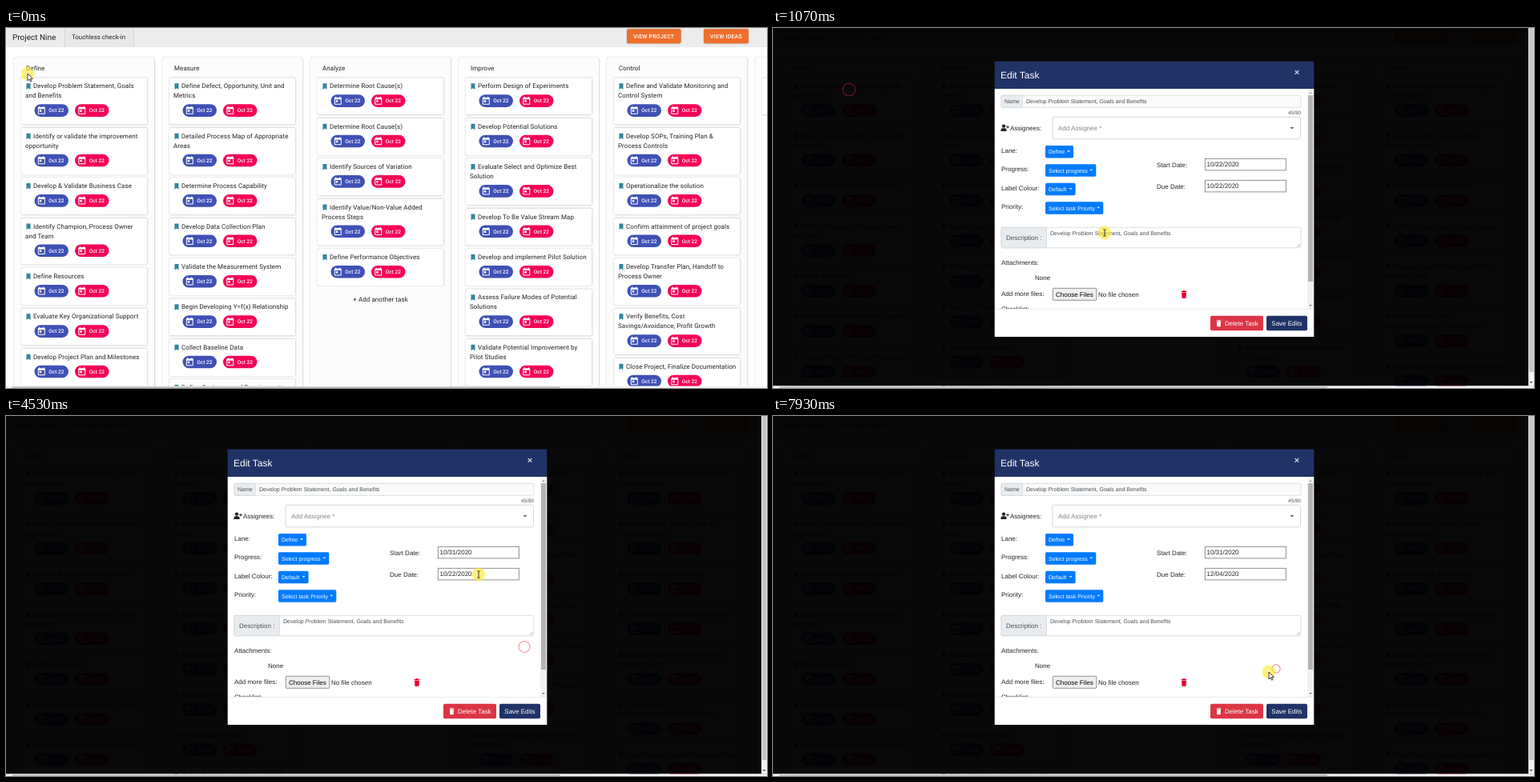
Recreate the animation shown at these times as an HTML page. Size 950 px wide and 450 px high, loop 8 s.

```html
<!DOCTYPE html>
<html lang="en">
<head>
<meta charset="utf-8">
<title>Edit task dates</title>
<style>
html, body { margin: 0; width: 100%; height: 100%; overflow: hidden; background: #fff; }
svg { display: block; width: 950px; height: 450px; text-rendering: geometricPrecision; }
text { white-space: pre; }
.board { font-family: Roboto, sans-serif; }
.modal { font-family: "Liberation Sans", Arial, sans-serif; }
.raised { filter: drop-shadow(0 .5px .5px rgba(0, 0, 0, .3)) drop-shadow(0 .5px 1px rgba(0, 0, 0, .18)); }
</style>
</head>
<body>
<svg id="stage" viewBox="0 0 950 450"></svg>
<script>
const LOOP = 8000;
const NAVY = '#203367';

const rect = (x, y, w, h, fill, attrs = '') =>
  `<rect x="${x}" y="${y}" width="${w}" height="${h}" fill="${fill}" ${attrs}/>`;
const path = (d, fill, attrs = '') => `<path d="${d}" fill="${fill}" ${attrs}/>`;
// cy is the middle of the capitals
const text = (x, cy, str, size = 8, fill = '#212529', attrs = '') =>
  `<text x="${x}" y="${cy + size * .36}" font-size="${size}" fill="${fill}" ${attrs}>${str.replace(/&/g, '&amp;')}</text>`;
const caret = (x, y, w, fill) => path(`M${x - w} ${y - w / 2}h${2 * w}l${-w} ${w}z`, fill);

// ---------- board ----------
const columns = [
  ['Define', 'Develop Problem Statement, Goals|and Benefits', 'Identify or validate the improvement|opportunity',
    'Develop & Validate Business Case', 'Identify Champion, Process Owner|and Team', 'Define Resources',
    'Evaluate Key Organizational Support', 'Develop Project Plan and Milestones'],
  ['Measure', 'Define Defect, Opportunity, Unit and|Metrics', 'Detailed Process Map of Appropriate|Areas',
    'Determine Process Capability', 'Develop Data Collection Plan', 'Validate the Measurement System',
    'Begin Developing Y=f(x) Relationship', 'Collect Baseline Data', 'Define Customer and Requirements'],
  ['Analyze', 'Determine Root Cause(s)', 'Determine Root Cause(s)', 'Identify Sources of Variation',
    'Identify Value/Non-Value Added|Process Steps', 'Define Performance Objectives'],
  ['Improve', 'Perform Design of Experiments', 'Develop Potential Solutions', 'Evaluate Select and Optimize Best|Solution',
    'Develop To Be Value Stream Map', 'Develop and implement Pilot Solution',
    'Assess Failure Modes of Potential|Solutions', 'Validate Potential Improvement by|Pilot Studies'],
  ['Control', 'Define and Validate Monitoring and|Control System', 'Develop SOPs, Training Plan &|Process Controls',
    'Operationalize the solution', 'Confirm attainment of project goals', 'Develop Transfer Plan, Handoff to|Process Owner',
    'Verify Benefits, Cost|Savings/Avoidance, Profit Growth', 'Close Project, Finalize Documentation'],
  ['', '']
];
const dayIcon = 'M19 3h-1V1h-2v2H8V1H6v2H5c-1.1 0-2 .9-2 2v14c0 1.1.9 2 2 2h14c1.1 0 2-.9 2-2V5c0-1.1-.9-2-2-2zm0 16H5V8h14v11zM7 10h5v5H7z';

const chip = (x, cy, fill) => rect(x, cy - 7.8, 42.5, 15.6, fill, 'rx="7.8"') +
  path(dayIcon, '#fff', `transform="translate(${x + 2.8} ${cy - 5.8}) scale(.5)"`) +
  text(x + 17.8, cy, 'Oct 22', 6.5, '#fff', 'font-weight="500"');

function card(x, y, title) {
  const lines = title.split('|');
  const height = 34.2 + 12 * lines.length;
  const chipY = y + 16.8 + 12 * lines.length;
  return rect(x + 9, y, 157.5, height, '#fff', 'rx="2" class="raised"') +
    path(`M${x + 15.5} ${y + 7}h5v7.5l-2.5-1.6l-2.5 1.6z`, '#31849b') +
    lines.map((line, i) => text(x + (i ? 14 : 24), y + 10.3 + 12 * i, line, 8, '#222', 'letter-spacing=".075"')).join('') +
    chip(x + 25.5, chipY, '#3f51b5') + chip(x + 76, chipY, '#f50057');
}

function column([title, ...tasks], index) {
  const x = 10 + 185 * index;
  let y = 62.3;
  let out = rect(x, 37, 175.5, 425, '#fcfcfc', 'rx="3" class="raised"') + text(x + 15, 50.5, title, 8, '#222', 'letter-spacing=".075"');
  for (const task of tasks) {
    out += card(x, y, task);
    y += task.includes('|') ? 62.4 : 50.4;
  }
  return out;
}

const orangeButton = (x, w, label) => rect(x, 1.2, w, 18, '#ee6f2d', 'rx="2" class="raised"') +
  text(x + w / 2, 10.1, label, 7, '#fff', 'font-weight="500" letter-spacing=".2" text-anchor="middle"');

const board = `<g class="board">` + rect(0, 0, 950, 450, '#fff') + rect(0, 0, 950, 24, '#ececec') +
  rect(73, 0, 86.5, 24, '#e8e8e8') + rect(73, 0, .7, 24, '#ccc') + rect(159, 0, .7, 24, '#ccc') +
  text(8, 11, 'Project Nine', 10, '#222') + text(82, 10.7, 'Touchless check-in', 7.9, '#222') +
  orangeButton(775, 67.5, 'VIEW PROJECT') + orangeButton(871, 56, 'VIEW IDEAS') +
  columns.map(column).join('') +
  text(467.5, 338.7, '+ Add another task', 8, '#222', 'text-anchor="middle" letter-spacing=".075"') +
  `<path id="hover" d="M20 121h156" stroke="#777" stroke-width="1" opacity="0"/></g>`;

const pageScrollbar = rect(0, 447.5, 950, 2.5, '#f4f4f4') + rect(8, 448.3, 684, 1.7, '#c1c1c1');
const sideScrollbar = rect(943, 0, 7, 447.5, '#f1f1f1') + rect(944, 0, 5.5, 430, '#c6c6c6') + caret(946.5, 443, 2, '#444');

// ---------- dialog ----------
const blueButton = (y, w, label) => rect(340, y, w, 15.5, '#007bff', 'rx="1.7"') +
  text(344, y + 7.8, label, 7, '#fff') + caret(340 + w - 6, y + 7.3, 1.9, '#fff');
const field = (x, y, w, h, fill = '#fff', stroke = '#ced4da', rx = 1.7) =>
  rect(x, y, w, h, fill, `stroke="${stroke}" stroke-width=".7" rx="${rx}"`);
const trash = (x, y, s, fill) => path('M-3-3.6h2l.5-.9h1l.5.9h2v1h-6zM-2.6-2h5.2l-.3 6.5h-4.6z', fill, `transform="translate(${x} ${y}) scale(${s})"`);
const taskName = 'Develop Problem Statement, Goals and Benefits';

const body = field(285, 84.3, 374, 15, '#fafafa') + field(285, 84.3, 26.5, 15, '#e9ecef') +
  text(289, 91.8, 'Name', 7, '#495057') + text(316, 91.8, taskName, 7, '#495057') +
  text(659, 106, '45/80', 6.4, '#555', 'text-anchor="end"') +
  `<circle cx="288" cy="122.6" r="2.2" fill="#212529"/>` + path('M284.4 129v-1.5q0-2.3 2.4-2.3h2.4q2.4 0 2.4 2.3v1.5zM291.2 123.3h1.3v-1.3h1v1.3h1.3v1h-1.3v1.3h-1v-1.3h-1.3z', '#212529') +
  text(296, 125, 'Assignees:') + field(349, 111.3, 309.5, 27.5, '#fff', '#c8c8c8', 2) +
  text(356, 125, 'Add Assignee *', 8, '#858585') + caret(648, 125.3, 2.6, '#666') +
  text(285, 153, 'Lane:') + text(285, 176.3, 'Progress:') + text(285, 200, 'Label Colour:') + text(285, 223.3, 'Priority:') +
  blueButton(147, 35, 'Define') + blueButton(170.3, 63.3, 'Select progress') +
  blueButton(193.8, 37.6, 'Default') + blueButton(217.3, 72.3, 'Select task Priority') +
  text(479, 170.7, 'Start Date:') + text(479, 197.7, 'Due Date:') +
  `<rect id="startBox" x="539.3" y="163.3" width="101" height="14.6" fill="#fff"/>
   <rect id="dueBox" x="539.3" y="190.3" width="101" height="14.6" fill="#fff"/>
   <text id="startDate" x="541.5" y="173.2" font-size="8" fill="#212529"></text>
   <text id="dueDate" x="541.5" y="200.2" font-size="8" fill="#212529"></text>
   <rect id="inputCaret" x="561.7" width=".7" height="9" fill="#000"/>` +
  field(285, 249.3, 374, 25.5) + field(285, 249.3, 56.5, 25.5, '#e9ecef') +
  text(291, 262, 'Description :', 8, '#495057') + text(346, 256.8, taskName, 7, '#495057') +
  path('M654 273.6l3.8-3.8M656 273.6l1.8-1.8', 'none', 'stroke="#888" stroke-width=".6"') +
  text(285, 293.3, 'Attachments:') + text(327, 312.3, 'None') + text(285, 332, 'Add more files:') +
  field(349.3, 325.3, 54.5, 15, '#efefef', '#666', 1) + text(353, 332.8, 'Choose Files', 8, '#000') +
  text(406, 332.8, 'No file chosen') + trash(513, 332.8, 1.1, '#e4002b') + text(285, 351, 'Checklist:');

const modal = `<g id="modal" class="modal">` + rect(276.7, 76, 398.6, 310, '#fff') +
  rect(276.7, 41.7, 398.6, 34.3, NAVY) + text(284, 58.5, 'Edit Task', 12, '#fff') +
  text(654, 55.5, '×', 11, '#d5dae6', 'text-anchor="middle" font-weight="bold"') +
  `<clipPath id="bodyClip"><rect x="277" y="76" width="398" height="275"/></clipPath><g clip-path="url(#bodyClip)">${body}</g>` +
  rect(667, 76, 8, 275, '#f1f1f1') + rect(668, 84, 6, 233, '#b4b4b4') +
  caret(671, 347, 1.7, '#444') + path('M669.3 82h3.4l-1.7-1.8z', '#888') +
  rect(276.7, 351, 398.6, .6, '#dee2e6') +
  rect(546, 359.7, 66, 18.5, '#dc3545', 'rx="2"') + trash(556.5, 369, .95, '#fff') + text(564, 369, 'Delete Task', 8, '#fff') +
  rect(616, 359.7, 51, 18.5, NAVY, 'rx="2"') + text(622.3, 369, 'Save Edits', 8, '#fff') + `</g>`;

// ---------- date picker ----------
// Five weeks from firstDay; numbering restarts once after lastDay.
function calendar(id, y, title, firstDay, lastDay, selected, accent) {
  const middle = 'text-anchor="middle"';
  const cellX = i => 550.7 + 16.23 * i;
  let out = rect(539.7, y, 119.5, 118.3, '#fff', 'stroke="#aeaeae" stroke-width=".6" rx="1.8"') +
    rect(540, y + .3, 119, 29.5, '#f0f0f0', 'rx="1.6"') + rect(540, y + 29.5, 119, .5, '#aeaeae') +
    path(`M584.5 ${y + .4}l4-4l4 4z`, '#f0f0f0', 'stroke="#bbb" stroke-width=".4"') +
    path(`M551.5 ${y + 6}v5.6l-3.4-2.8zM647.5 ${y + 6}v5.6l3.4-2.8z`, '#c4c4c4') +
    text(599.5, y + 9.2, title, 7.55, '#000', middle + ' font-weight="bold"');
  ['Su', 'Mo', 'Tu', 'We', 'Th', 'Fr', 'Sa'].forEach((d, i) => out += text(cellX(i), y + 23, d, 6.4, '#000', middle));
  for (let i = 0; i < 35; i++) {
    const count = firstDay + i;
    const day = count > lastDay ? count - lastDay : count;
    const x = cellX(i % 7), cy = y + 42.4 + 16.2 * Math.floor(i / 7);
    const chosen = i === selected;
    if (chosen) out += rect(x - 6.8, cy - 6.8, 13.6, 13.6, accent, 'rx="2.4"');
    out += text(x, cy, String(day), 6.4, chosen ? '#fff' : '#000', middle);
  }
  return `<g id="${id}" class="modal">${out}</g>`;
}

// ---------- pointer ----------
const ink = 'stroke="#111" stroke-width=".8" stroke-linejoin="round"';
const pointer = `<circle id="ring" fill="none" stroke="#e8203c" stroke-width="1.1"/>
  <g id="pointer"><circle r="8.4" fill="#ffe92e" opacity=".62"/>
  ${path('M0 0v9l2.1-2l1.4 3.2l1.4-.6l-1.4-3.1h2.8z', '#fff', `id="arrow" ${ink}`)}
  ${path('M-.7.6q.9-1 1.7 0v4.2l4 .8q1.2.4 1 1.8l-.6 4.6h-4.9l-3-4.2q.3-1.4 1.8-.2z', '#fff', `id="hand" ${ink}`)}
  ${path('M-1.8-4.2q1.8 0 1.8.9q0-.9 1.8-.9M0-3.3v6.8M-1.8 4.4q1.8 0 1.8-.9q0 .9 1.8.9', 'none', 'id="beam" stroke="#222" stroke-width=".9"')}</g>`;

document.getElementById('stage').innerHTML = board +
  rect(0, 0, 950, 447.5, '#000', 'id="backdrop"') + pageScrollbar + `<g id="side">${sideScrollbar}</g>` + modal +
  calendar('startOctober', 184, 'October 2020', 27, 30, 25, '#216ba5') +
  calendar('dueOctober', 211, 'October 2020', 27, 30, 25, '#216ba5') +
  calendar('dueNovember', 211, 'November 2020', 1, 30, 21, '#2a87d0') + pointer;

// ---------- timeline ----------
const DIM = 578, OPEN = 587, START_FOCUS = 2700, START_PICK = 4130, DUE_FOCUS = 4950, NEXT_MONTH = 6250, DUE_PICK = 7680;
const moves = [
  [0, 27, 57], [70, 27, 57], [480, 95, 77], [760, 95, 77], [1070, 414, 256], [1550, 375, 348], [1800, 362, 350],
  [2480, 590, 170], [2740, 590, 170], [3000, 636, 278], [3450, 647, 288], [4230, 647, 288], [4520, 590, 198],
  [5240, 590, 198], [5530, 646, 325], [5670, 646, 325], [6060, 651, 219], [6680, 651, 219], [7250, 628, 316],
  [7740, 628, 316], [7920, 619, 320], [8000, 619, 320]
];
const shapes = [[0, 'arrow'], [300, 'hand'], [780, 'arrow'], [1030, 'beam'], [1150, 'arrow'], [2330, 'beam'],
  [2800, 'hand'], [4160, 'arrow'], [4470, 'beam'], [5330, 'hand'], [7700, 'arrow']];
const clicks = [[560, 95, 77], [START_FOCUS - 40, 590, 170], [START_PICK, 647, 288.5], [DUE_FOCUS - 40, 590, 198],
  [NEXT_MONTH, 651, 219], [DUE_PICK, 628, 316]];

const clamp = v => Math.max(0, Math.min(1, v));
const smooth = v => v * v * (3 - 2 * v);
const latest = (list, t) => list.filter(item => item[0] <= t).pop();
const $ = id => document.getElementById(id);
const set = (id, attrs) => { for (const k in attrs) $(id).setAttribute(k, attrs[k]); };
const show = (id, on) => { $(id).style.display = on ? '' : 'none'; };

function position(t) {
  const next = Math.max(1, moves.findIndex(m => m[0] > t));
  const [t0, x0, y0] = moves[next - 1], [t1, x1, y1] = moves[next];
  const k = smooth(clamp((t - t0) / (t1 - t0)));
  return [x0 + (x1 - x0) * k, y0 + (y1 - y0) * k];
}

function render(t) {
  const fade = clamp((t - OPEN) / 150);
  const slide = -25 * (1 - clamp((t - OPEN) / 280)) ** 2;
  set('backdrop', { opacity: .965 * clamp((t - DIM) / 150) });
  set('side', { opacity: fade });
  set('modal', { opacity: fade, transform: `translate(0 ${slide})` });
  set('hover', { opacity: t > 400 ? .8 : 0 });

  const startOpen = t >= START_FOCUS && t < START_PICK;
  const dueOpen = t >= DUE_FOCUS && t < DUE_PICK;
  show('startOctober', startOpen);
  show('dueOctober', dueOpen && t < NEXT_MONTH);
  show('dueNovember', dueOpen && t >= NEXT_MONTH);
  $('startDate').textContent = t < START_PICK ? '10/22/2020' : '10/31/2020';
  $('dueDate').textContent = t < DUE_PICK ? '10/22/2020' : '12/04/2020';

  const dueFocused = dueOpen && t < NEXT_MONTH;
  const border = on => ({ stroke: on ? '#101010' : '#767676', 'stroke-width': on ? 1.5 : .8 });
  set('startBox', border(startOpen));
  set('dueBox', border(dueFocused));
  set('inputCaret', { y: startOpen ? 165.8 : 192.8 });
  show('inputCaret', startOpen && (t - START_FOCUS) % 1000 < 500 || dueFocused && (t - DUE_FOCUS) % 1000 < 500);

  const [x, y] = position(t);
  set('pointer', { transform: `translate(${x} ${y})` });
  const shape = latest(shapes, t)[1];
  ['arrow', 'hand', 'beam'].forEach(id => show(id, id === shape));

  const click = latest(clicks, t);
  const age = click ? (t - click[0]) / 600 : 1;
  show('ring', age < 1);
  if (age < 1) set('ring', { cx: click[1], cy: click[2], r: 8 * Math.sin(Math.PI / 2 * age) ** .9, opacity: .5 });
}

function frame() {
  render(performance.now() % LOOP);
  requestAnimationFrame(frame);
}
frame();
</script>
</body>
</html>
```
